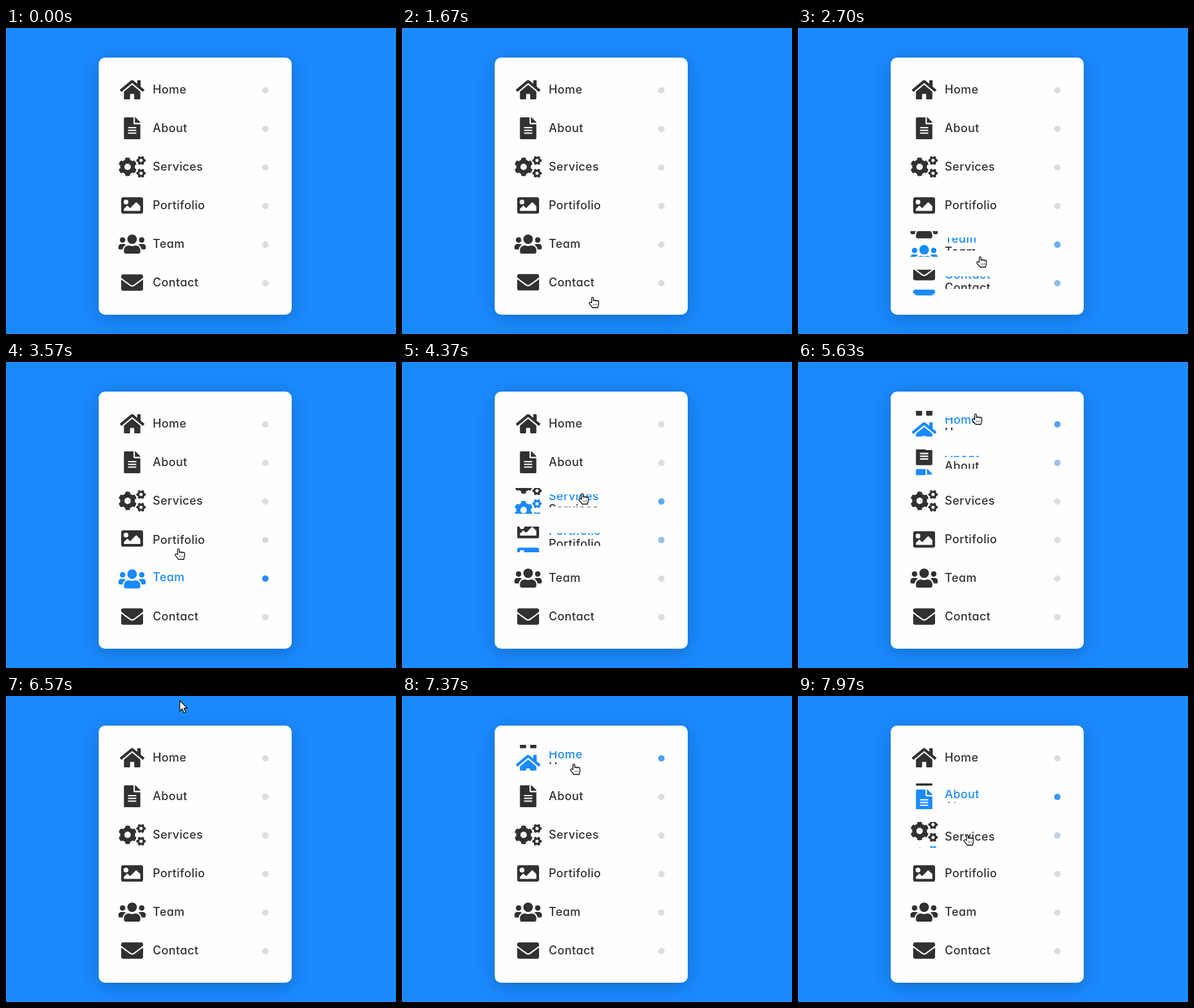
Animation of 606 by 476 pixels, one loop 8 s. Source, as an HTML page:

```html
<!DOCTYPE html>
<html lang="en">
<head>
<meta charset="utf-8">
<title>Menu hover</title>
<style>
  :root { --blue: #1a8aff; --ink: #313133; --pale: #dddddd; --card: #fefefe; }
  html, body { margin: 0; width: 100%; height: 100%; overflow: hidden; background: var(--blue); }
  #card {
    position: absolute; left: 144px; top: 46px; width: 300px; height: 400px;
    border-radius: 10px; background: var(--card);
    box-shadow: 0 5px 30px rgba(0, 0, 0, .22);
  }
  .row { position: absolute; left: 0; width: 300px; height: 60px; --p: 0; }
  .icon, .label { position: absolute; overflow: hidden; }
  .icon { left: 28px; top: 10px; width: 48px; height: 40px; }
  .label {
    left: 84px; top: 20px; width: 150px; height: 20px;
    font: 500 18px/20px Inter, sans-serif; letter-spacing: .4px;
    font-feature-settings: "cv11"; white-space: nowrap;
  }
  .icon > *, .label > * { position: absolute; left: 0; top: 0; }
  .icon > * { width: 48px; height: 40px; transform: translateY(calc(var(--p) * -40px)); }
  .icon > .hot { top: 40px; }
  .label > * { transform: translateY(calc(var(--p) * 20px)); }
  .label > .hot { top: -20px; }
  .cold { color: var(--ink); }
  .hot { color: var(--blue); }
  .dot {
    position: absolute; left: 254px; top: 26px; width: 10px; height: 10px; border-radius: 50%;
    background: color-mix(in srgb, var(--blue) calc(var(--p) * 100%), var(--pale));
  }
  #cursor { position: absolute; left: 0; top: 0; width: 24px; height: 26px; overflow: visible; }
  #cursor path { fill: #fff; stroke: #111; stroke-width: 1.3; stroke-linejoin: round; }
</style>
</head>
<body>
<div id="card"></div>
<svg id="cursor">
  <g id="arrow"><path d="M0 0V16.5L3.8 13L6.6 19.5L9.4 18.3L6.6 12H11.8Z"/></g>
  <g id="hand" transform="translate(-6 -.5)">
    <path d="M4.6 9V1.8a1.4 1.4 0 0 1 2.8 0V6a1.35 1.35 0 0 1 2.7.3a1.35 1.35 0 0 1 2.7.4a1.35 1.35 0 0 1 2.7.6V11.5c0 2-1.2 2.5-1.2 5H5.8C5.8 14.5.7 11.5.7 9.6S3 7.6 4.6 9Z"/>
    <path d="M7.8 10.5v2.5M10.2 10.5v2.5M12.6 10.5v2.5" style="stroke-width:.7"/>
  </g>
</svg>
<script>
const LOOP = 8000, FADE = 500, ROW_HEIGHT = 60;

const circle = (x, y, r) => `M${x - r} ${y}a${r} ${r} 0 1 0 ${2 * r} 0a${r} ${r} 0 1 0 ${-2 * r} 0z`;

// Six-toothed wheel with a round hole; turn is the angle of the first tooth.
function gear(x, y, outer, root, hole, turn) {
  const at = (r, a) => `${(x + r * Math.cos(a)).toFixed(1)} ${(y + r * Math.sin(a)).toFixed(1)}`;
  let d = '';
  for (let i = 0; i < 6; i++) {
    const a = turn + i * Math.PI / 3;
    d += (i ? `A${root} ${root} 0 0 1 ` : 'M') + at(root, a - .33) +
      'L' + at(outer * .96, a - .27) + 'Q' + at(outer * 1.05, a) + ' ' + at(outer * .96, a + .27) +
      'L' + at(root, a + .33);
  }
  return d + 'z' + circle(x, y, hole);
}

const items = [
  { name: 'Home', width: 576, path: 'M280 148L96 300V464a16 16 0 0 0 16 16h112a16 16 0 0 0 16-16V368a16 16 0 0 1 16-16h64a16 16 0 0 1 16 16v96a16 16 0 0 0 16 16h112a16 16 0 0 0 16-16V300L296 148a12 12 0 0 0-16 0zM572 251L488 183V44a12 12 0 0 0-12-12h-56a12 12 0 0 0-12 12v73L318 43a48 48 0 0 0-61 0L4 251a12 12 0 0 0-1 17l25 31a12 12 0 0 0 17 2L280 107a12 12 0 0 1 16 0L531 301a12 12 0 0 0 17-2l25-31a12 12 0 0 0-1-17z' },
  { name: 'About', width: 384, path: 'M224 136V0H24A24 24 0 0 0 0 24v464a24 24 0 0 0 24 24h336a24 24 0 0 0 24-24V160H248a24 24 0 0 1-24-24zM96 224h192v32H96zM96 288h192v32H96zM96 352h192v32H96zM384 122v6H256V0h6a24 24 0 0 1 17 7l98 98a24 24 0 0 1 7 17z' },
  { name: 'Services', width: 640, path: gear(214, 256, 220, 174, 76, Math.PI / 6) + gear(528, 106, 112, 86, 38, 0) + gear(528, 406, 112, 86, 38, 0) },
  { name: 'Portifolio', width: 512, path: 'M464 448H48a48 48 0 0 1-48-48V112a48 48 0 0 1 48-48h416a48 48 0 0 1 48 48v288a48 48 0 0 1-48 48zM64 384h384V272l-88-88a12 12 0 0 0-16 0L208 320l-56-56a12 12 0 0 0-16 0L64 336z' + circle(112, 176, 56) },
  { name: 'Team', width: 640, path: circle(96, 160, 64) + circle(544, 160, 64) + circle(320, 144, 112) + 'M576 256h-64a64 64 0 0 0-45 19c40 22 69 62 75 109h66a32 32 0 0 0 32-32v-32a64 64 0 0 0-64-64zM397 288h-8a158 158 0 0 1-138 0h-8A115 115 0 0 0 128 403v29a48 48 0 0 0 48 48h288a48 48 0 0 0 48-48v-29a115 115 0 0 0-115-115zM173 275A64 64 0 0 0 128 256H64a64 64 0 0 0-64 64v32a32 32 0 0 0 32 32h66c6-47 35-87 75-109z' },
  { name: 'Contact', width: 512, path: 'M502 191c4-3 10 0 10 5V400a48 48 0 0 1-48 48H48a48 48 0 0 1-48-48V196c0-5 6-8 10-5 22 17 52 39 154 114 21 15 57 47 92 47 36 0 72-33 92-47 102-75 132-97 154-114zM256 320c23 0 57-29 73-41 133-97 143-105 174-129a24 24 0 0 0 9-19v-19a48 48 0 0 0-48-48H48a48 48 0 0 0-48 48v19a24 24 0 0 0 9 19c31 24 41 32 174 129 17 12 50 41 73 41z' }
];

// Which row the pointer is on from each moment; -1 is none.
const hovers = [[1660, 5], [2530, 4], [3545, 3], [4185, 2], [4800, 1], [5430, 0], [5820, -1],
  [7150, 0], [7480, 1], [7905, 2], [LOOP, -1]];

// Pointer tip: time, x, y.
const track = [[1250, 301, 480], [1670, 296, 419], [2530, 286, 366], [3545, 269, 304], [3570, 268, 291],
  [4185, 277, 246], [4370, 280, 205], [4800, 279, 186], [5430, 277, 126], [5630, 276, 81], [5820, 274, 65],
  [6570, 270, 7], [6720, 270, 5], [7150, 268, 66], [7480, 266, 126], [7905, 264, 190], [LOOP, 263, 228]];

const card = document.getElementById('card');
const cursor = document.getElementById('cursor');
const arrow = document.getElementById('arrow');
const hand = document.getElementById('hand');

const rows = items.map(({ name, width, path }, i) => {
  const row = document.createElement('div');
  const both = make => make('cold') + make('hot');
  row.className = 'row';
  row.style.top = 20 + i * ROW_HEIGHT + 'px';
  row.innerHTML =
    `<div class="icon">${both(c => `<svg class="${c}"><path fill="currentColor" fill-rule="evenodd"
      transform="translate(24 20) scale(${34 / 512}) translate(${-width / 2} -256)" d="${path}"/></svg>`)}</div>
    <div class="label">${both(c => `<span class="${c}"${c === 'hot' ? ' aria-hidden="true"' : ''}>${name}</span>`)}</div>
    <div class="dot"></div>`;
  card.append(row);
  return row;
});

// cubic-bezier(.25, .1, .25, 1)
function ease(x) {
  if (x <= 0) return 0;
  if (x >= 1) return 1;
  let low = 0, high = 1;
  for (let i = 0; i < 20; i++) {
    const s = (low + high) / 2, r = 1 - s;
    if (.75 * r * s + s ** 3 < x) low = s; else high = s;
  }
  const r = 1 - low;
  return .3 * r * r * low + 3 * r * low * low + low ** 3;
}

function progress(row, t) {
  let p = 0;
  hovers.forEach(([start, hovered], i) => {
    if (hovered !== row || t < start) return;
    const end = hovers[i + 1][0];
    p = ease((Math.min(t, end) - start) / FADE);
    if (t > end) p *= 1 - ease((t - end) / (FADE * p));
  });
  return p;
}

function pointerAt(t) {
  const i = track.findIndex(key => key[0] > t);
  if (i < 1) return null;
  const [t0, x0, y0] = track[i - 1], [t1, x1, y1] = track[i];
  const k = (t - t0) / (t1 - t0);
  return [x0 + (x1 - x0) * k, y0 + (y1 - y0) * k];
}

function draw() {
  const t = performance.now() % LOOP;
  rows.forEach((row, i) => row.style.setProperty('--p', progress(i, t).toFixed(4)));

  const tip = pointerAt(t);
  cursor.style.display = tip ? '' : 'none';
  if (tip) {
    const current = hovers.filter(([start]) => start <= t).pop();
    const hovering = Boolean(current) && current[1] >= 0;
    cursor.style.transform = `translate(${Math.round(tip[0])}px, ${Math.round(tip[1])}px)`;
    arrow.style.display = hovering ? 'none' : '';
    hand.style.display = hovering ? '' : 'none';
  }
  requestAnimationFrame(draw);
}
draw();
</script>
</body>
</html>
```
